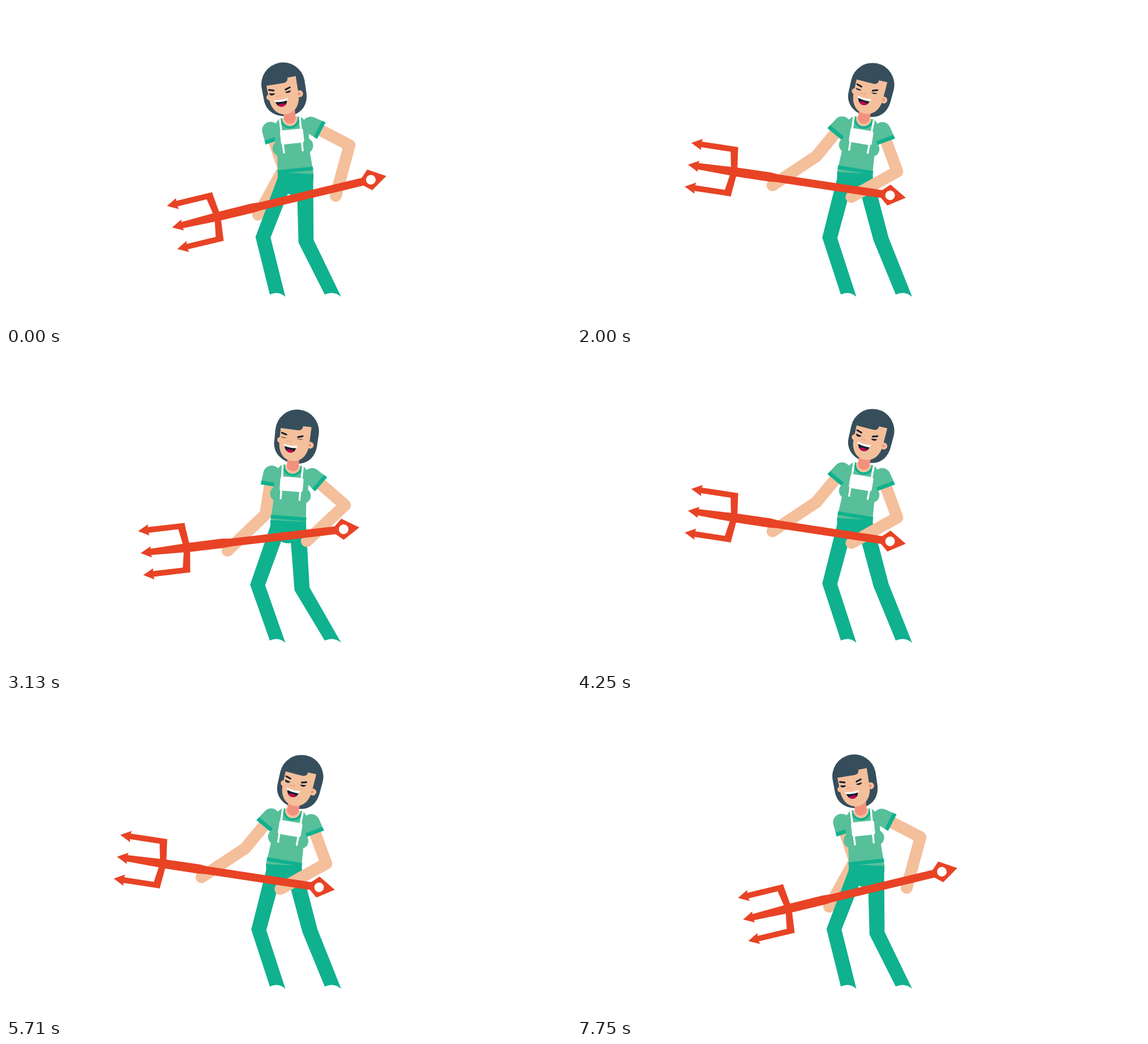
Recreate the animation shown at these times as an HTML page. Size 998 by 561 pixels, loop 8.04 s.

```html
<!DOCTYPE html>
<html lang="en">
<head>
<meta charset="utf-8">
<title>Trident dance</title>
<style>
  html, body { margin: 0; width: 100%; height: 100%; overflow: hidden; background: #fff; }
  svg { display: block; width: 100%; height: 100%; }
  .skin { fill: #f4bf9b; }
  .arm { fill: none; stroke: #f4bf9b; stroke-width: 21; stroke-linecap: round; stroke-linejoin: round; }
  .shirt { fill: #57bf99; }
  .green { fill: #10b18f; }
  .hair { fill: #364e5c; }
  .pink { fill: #f1917d; }
  .dark { fill: #14202f; }
  .red { fill: #e84325; }
  .white { fill: #fff; }
  .brow { stroke: #14202f; stroke-width: 3; stroke-linecap: round; }
  .strap { stroke: #fff; stroke-width: 3.4; stroke-linecap: round; }
</style>
</head>
<body>
<svg viewBox="0 0 998 561">
  <defs>
    <g id="sleeve">
      <circle class="shirt" r="15"/>
      <path class="shirt" d="M0-15L15-16V16L0 15Z"/>
      <path class="green" d="M14-16L21-16.5V16.5L14 16Z"/>
    </g>
    <path id="prong" d="M-361 0L-342-10L-343-5H-278V5H-343L-342 10Z"/>
  </defs>

  <path id="armL" class="arm"/>
  <use id="sleeveL" href="#sleeve"/>

  <g class="torso">
    <path class="shirt" d="M-31.5 6L-29-34L-30-55L-31-85L-19-98H19L31-85L30-55L29-34L31.5 6Z"/>
    <circle class="shirt" cx="-22" cy="-46" r="14"/>
    <circle class="shirt" cx="22" cy="-46" r="14"/>
    <path class="green" d="M-31.5-8H31.5V-1.5H-31.5Z"/>
  </g>

  <path id="legL" class="green"/>
  <path id="legR" class="green"/>
  <path id="pelvis" class="green" d="M-31.5-1L31.5 2V12Q20 40 0 40Q-12 40-18 32L-31.5 12Z"/>

  <g class="head">
    <path class="hair" d="M-39 0A38.5 38.5 0 0 1 38 0L37 22C36 42 24 57 0 57C-20 56-39 44-39 22Z"/>
  </g>

  <path id="armR" class="arm"/>
  <use id="sleeveR" href="#sleeve"/>

  <g class="torso">
    <path class="green" d="M-18.5-98A18.5 19 0 0 0 18.5-98Z"/>
    <path class="skin" d="M-14-98A14 15 0 0 0 14-98Z"/>
    <path class="pink" d="M-10.5-114H10.5V-98A10.5 10.5 0 0 1-10.5-98Z"/>
    <path class="strap" d="M-17.8-97L-16.6-38M17.8-97L16.6-38"/>
    <rect class="white" x="-20" y="-77" width="41" height="25" rx="4"/>
  </g>

  <g class="head">
    <circle class="skin" cx="-29" cy="18" r="5"/>
    <path class="skin" d="M-30-3V22C-29 42-18 53-4 53C12 53 22 40 23 22L24-10H9C9-5 6-2 0-2Z"/>
    <circle class="skin" cx="25" cy="22" r="6"/>
    <circle class="pink" cx="24" cy="22" r="2.4"/>
    <path class="brow" d="M-27 5L-19 7.5M2 10L10 7.5"/>
    <g id="eyes">
      <path class="dark" d="M-28-2L-18 0L-18 1Q-20 3-24 2.5Q-27 2-28-2Z"/>
      <path class="dark" d="M0 1L11 0Q10 3 6 3.5Q2 4 0 1Z"/>
    </g>
    <circle class="pink" cx="-15" cy="18.5" r="1.2"/>
    <circle class="pink" cx="-10" cy="19" r="1.2"/>
    <path class="white" d="M-22 24Q-9 28 3 25L1 30Q-10 32-20 29Z"/>
    <path class="dark" d="M-20 28Q-9 31 0.5 29.5C0 35-4 38.5-10 38.5C-15 38-19 34-20 28Z"/>
    <path d="M-17 35Q-10 30.500-2 35.500Q-5 38.500-10 38.500Q-14 38-17 35Z" fill="#c3044f"/>
  </g>

  <g id="trident" class="red">
    <path d="M-14-7H-201L-215-8.500L-273-8L-344-5.500V5.500L-273 8H-215L-201 7H-14Z"/>
    <path d="M28 0L-2-19L-15-7V7L-2 18.500Z"/>
    <path d="M-290-34L-278-44L-273 0L-278 44L-290 34L-284 0Z"/>
    <use href="#prong"/>
    <use href="#prong" y="-39"/>
    <use href="#prong" y="39"/>
    <circle class="white" r="8.500"/>
  </g>
</svg>

<script>
const LOOP = 8040, STEP = LOOP / 193;
const $ = id => document.getElementById(id);

// waist x y tilt | head x y tilt | trident x y tilt | left knee x y | right knee x y
const back    = [511.5, 294.5, -6, 490, 138, -11, 644.5, 306.5, -13.5, 454, 408, 530, 415];
const forward = [491, 294, 9.3, 522.5, 139, 12.5, 553, 334, 8.6, 446.5, 409, 537, 411];
const rising  = [504, 299, 2.5, 512, 141, 0, 573, 328.8, 0.4, 445, 411, 520, 421];
const sinking = [513.5, 302, -6.5, 490, 146.5, -12.5, 602, 307.5, -15, 445.5, 410.5, 518, 423];
const crouch  = [519, 304, -11, 477, 150, -19, 626.5, 291, -24, 448, 411, 519, 424];
const lunging = [498.5, 297.5, 4.8, 515, 140, 6, 596, 313, -6.5, 444.5, 411, 523, 418];

const mix = (a, b, k) => a.map((v, i) => v + (b[i] - v) * k);
const forwardMax = mix(forward, rising, -0.25);
const backMax = back.map((v, i) => i === 1 || i === 4 ? v - 3 : v);

// Each move dips into the crouch and comes back out.
const keys = [];
function move(start, length, from, to) {
  const add = (t, pose) => keys.push({ t: start + t, pose });
  const out = k => 790 + (length - 790) * k;
  add(0, from);
  if (from === back) add(130, backMax);
  else {
    add(140, forwardMax);
    add(330, rising);
    add(500, sinking);
  }
  add(790, crouch);
  if (to === forward) add(out(0.45), lunging);
  add(out(0.78), to === back ? backMax : forwardMax);
  add(length, to);
}
move(290, 1380, back, forward);
move(2000, 1540, forward, forward);
move(4250, 1460, forward, forward);
move(6380, 1370, forward, back);

// Monotone cubic interpolation between keys
const slope = (n, i) => (keys[n + 1].pose[i] - keys[n].pose[i]) / (keys[n + 1].t - keys[n].t);
function tangent(n, i) {
  if (n === 0 || n === keys.length - 1) return 0;
  const a = slope(n - 1, i), b = slope(n, i);
  return a * b > 0 ? 2 * a * b / (a + b) : 0;
}
function poseAt(t) {
  const last = keys.length - 1;
  if (t <= keys[0].t) return keys[0].pose;
  if (t >= keys[last].t) return keys[last].pose;
  const n = keys.findIndex(k => k.t > t) - 1;
  const a = keys[n], b = keys[n + 1], d = b.t - a.t, u = (t - a.t) / d;
  const h = u * u * (3 - 2 * u);
  return a.pose.map((v, i) => v + (b.pose[i] - v) * h
    + d * u * (1 - u) * ((1 - u) * tangent(n, i) - u * tangent(n + 1, i)));
}

function turn([x, y, deg], px, py) {
  const r = deg * Math.PI / 180, c = Math.cos(r), s = Math.sin(r);
  return [x + px * c - py * s, y + px * s + py * c];
}

function elbow(s, h, upper, fore) {
  const dx = h[0] - s[0], dy = h[1] - s[1];
  const d = Math.min(Math.hypot(dx, dy), upper + fore - 0.1);
  const along = (upper * upper - fore * fore + d * d) / (2 * d);
  const side = Math.sqrt(Math.max(0, upper * upper - along * along));
  return [s[0] + (dx * along + dy * side) / d, s[1] + (dy * along - dx * side) / d];
}

const place = ([x, y, r]) => `translate(${x} ${y}) rotate(${r})`;
const put = (el, f) => el.setAttribute('transform', place(f));

function arm(side, s, h, upper) {
  const e = elbow(s, h, upper, 92.5);
  $('arm' + side).setAttribute('d', `M${s}L${e}L${h}`);
  put($('sleeve' + side), [...s, Math.atan2(e[1] - s[1], e[0] - s[0]) * 180 / Math.PI]);
}

function leg(side, hx, hy, kx, ky, skew, foot, width) {
  $('leg' + side).setAttribute('d',
    `M${hx - 14.5} ${hy}L${kx - 13.3} ${ky + skew}L${foot} 509` +
    `Q${foot + width * 0.55} 502 ${foot + width} 513` +
    `L${kx + 13.3} ${ky - skew}L${hx + 14.5} ${hy}Z`);
}

const lid = (t, mid, half) => Math.min(1, 0.25 + 0.75 * Math.abs(t - mid) / half);

function draw(t) {
  const p = poseAt(t);
  const waist = p.slice(0, 3), head = p.slice(3, 6), fork = p.slice(6, 9);
  document.querySelectorAll('.torso').forEach(g => put(g, waist));
  document.querySelectorAll('.head').forEach(g => put(g, head));
  put($('trident'), fork);
  put($('pelvis'), [waist[0], waist[1], 0]);
  arm('L', turn(waist, -36, -79.5), turn(fork, -208, 13.5), 72);
  arm('R', turn(waist, 35.5, -81), turn(fork, -67, 13), 77);
  leg('L', waist[0] - 16, waist[1] + 6, p[9], p[10], -0.5, 466, 27.5);
  leg('R', waist[0] + 16.5, waist[1] + 6, p[11], p[12], 2.5, 563, 29);
  const open = Math.min(lid(t, 2040, 80), lid(t, 3130, 125));
  $('eyes').setAttribute('transform', `translate(0 13) scale(1 ${open})`);
}

function tick() {
  const t = performance.now() % LOOP;
  draw(Math.floor((t + 3) / STEP) * STEP);
  requestAnimationFrame(tick);
}
tick();
</script>
</body>
</html>
```
